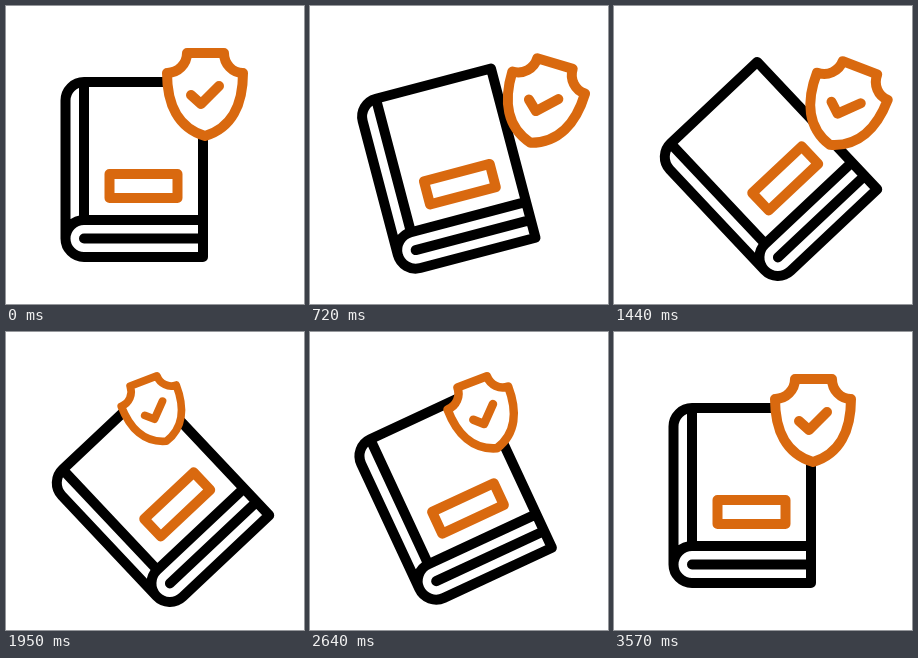
Animation, 298 px wide and 298 px high, one loop 3.6 s. Source, as an HTML page:

```html
<!DOCTYPE html>
<html lang="en">
<head>
<meta charset="utf-8">
<title>Book and shield</title>
<style>
  html, body { margin: 0; height: 100%; overflow: hidden; background: #fff; }
  svg { display: block; width: 100vw; height: 100vh; }
  path, rect { fill: none; stroke-width: 10; stroke-linecap: round; stroke-linejoin: round; }
  .ink { stroke: #000; }
  .accent { stroke: #d9690f; }
  .plate { fill: #fff; }
</style>
</head>
<body>
<svg viewBox="0 0 298 298">
  <g id="book">
    <path class="ink" d="M59.5 232.5V94.5A18.5 18.5 0 0 1 78 76H197V251H78A18.5 18.5 0 0 1 78 214H197M78 76V214M78 232.5H197"/>
    <rect class="accent" x="103.5" y="168" width="68" height="24"/>
  </g>
  <g id="shield">
    <path class="accent plate" d="M-18-41H19A19 20 0 0 0 38-21C38 10 27 34 0 42C-27 34-38 10-38-21A20 20 0 0 0-18-41Z"/>
    <path class="accent" d="M-14 1L-4 10L14-8"/>
  </g>
</svg>
<script>
const LOOP = 3600;
const book = document.getElementById('book');
const shield = document.getElementById('shield');

const REST = [199, 88];
const RIGHT = [241, 99];
const TOP = [116, 57];

const mix = (a, b, p) => a + (b - a) * p;

// Smooth progress from start to end; power < 1 moves the fast part earlier.
function ease(t, start, end, power = 1) {
  const u = Math.min(1, Math.max(0, (t - start) / (end - start))) ** power;
  return u * u * (3 - 2 * u);
}

// Point on a quadratic curve.
function curve(from, control, to, p) {
  return from.map((a, i) => mix(mix(a, control[i], p), mix(control[i], to[i], p), p));
}

function shieldPosition(t) {
  if (t < 1260) return curve(REST, [220, 93], RIGHT, ease(t, 275, 900));
  if (t < 2300) return curve(RIGHT, [178, 106], TOP, ease(t, 1260, 2300));
  return curve(TOP, [177, 88], REST, ease(t, 2300, 3200, 0.6));
}

function draw(now) {
  const t = now % LOOP;

  const lean = ease(t, 290, 1390) - ease(t, 2055, 3360);
  book.setAttribute('transform',
    `translate(${25 * lean} ${3.4 * lean}) rotate(${-43.3 * lean} 128 163.5)`);

  const [x, y] = shieldPosition(t);
  const angle = 21 * ease(t, 275, 900) - 43 * ease(t, 1440, 2000) + 22 * ease(t, 2550, 3200);
  const scale = 1 - 0.24 * (ease(t, 1400, 2050) - ease(t, 2300, 3100));
  shield.setAttribute('transform', `translate(${x} ${y}) rotate(${angle}) scale(${scale})`);

  requestAnimationFrame(() => draw(performance.now()));
}
draw(0);
</script>
</body>
</html>
```
